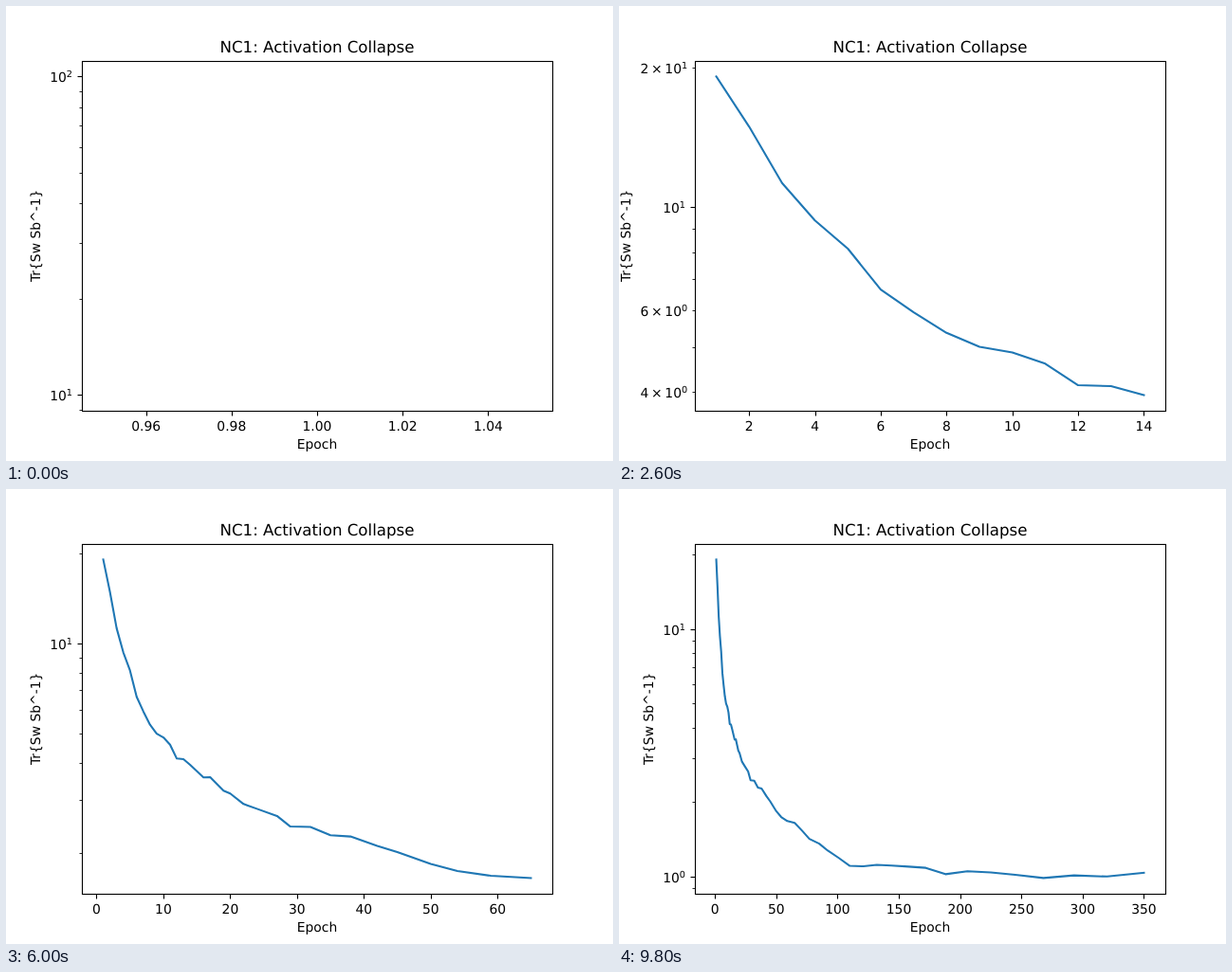
Recreate the animation shown at these times as an HTML page. Size 640x480 px, loop 10000 ms.

```html
<!DOCTYPE html>
<html lang="en">
<head>
<meta charset="utf-8">
<title>Activation Collapse</title>
<style>
  html, body { margin: 0; width: 100%; height: 100%; overflow: hidden; background: #fff; }
  svg { display: block; width: 640px; height: 480px; }
  text { font: 13.889px "DejaVu Sans", sans-serif; text-rendering: geometricPrecision; text-anchor: middle; }
  .title { font-size: 16.667px; }
  .log { text-anchor: end; }
  .sup { font-size: 9.722px; }
  path, rect { fill: none; stroke: #000; stroke-width: 1.11; }
  .minor { stroke-width: .83; }
  .curve { stroke: #1f77b4; stroke-width: 2.083; stroke-linejoin: round; stroke-linecap: square; }
</style>
</head>
<body>
<svg viewBox="0 0 640 480">
  <g id="plot"></g>
  <rect x="80.5" y="58.5" width="496" height="369"/>
  <text class="title" x="328" y="49">NC1: Activation Collapse</text>
  <text x="328" y="467">Epoch</text>
  <text id="ylabel">Tr{Sw Sb^-1}</text>
</svg>
<script>
const STEP_MS = 200;
const epochs = [
  1, 2, 3, 4, 5, 6, 7, 8, 9, 10, 11, 12, 13, 14, 16, 17, 19, 20, 22, 24, 27, 29, 32, 35, 38,
  42, 45, 50, 54, 59, 65, 71, 77, 85, 92, 101, 110, 121, 132, 144, 158, 172, 188, 206, 225,
  245, 268, 293, 320, 350];
// log10 of the plotted value at each epoch
const logs = [
  1.2817, 1.1736, 1.0521, .9714, .9107, .8227, .7738, .7293, .6993, .687,
  .6629, .6165, .6145, .5953, .5536, .5544, .5088, .4994, .4644, .4484,
  .4245, .3892, .3877, .3598, .3558, .3245, .304, .264, .2407, .2245,
  .217, .1857, .1523, .1329, .1049, .075, .0432, .0413, .0473, .0443,
  .0402, .0352, .0095, .0216, .0169, .007, -.006, .0046, 0, .0153];

const plot = document.getElementById('plot');
const ylabel = document.getElementById('ylabel');
const snap = v => Math.floor(v + .5) + .5;
const padded = (lo, hi) => [lo - (hi - lo) * .05, hi + (hi - lo) * .05];

// Round step giving at most nine intervals
function linearTicks([lo, hi]) {
  const raw = (hi - lo) / 9;
  const scale = 10 ** Math.floor(Math.log10(raw));
  const step = [1, 2, 2.5, 5, 10].map(s => s * scale).find(s => s >= raw);
  const ticks = [];
  for (let i = Math.ceil(lo / step); i * step <= hi; i++) ticks.push(i * step);
  let digits = 0;
  while (Math.abs(step * 10 ** digits - Math.round(step * 10 ** digits)) > 1e-6) digits++;
  return { ticks, digits };
}

function logTicks([lo, hi]) {
  const inside = v => Math.log10(v) >= lo && Math.log10(v) <= hi;
  const decades = [0, 1, 2].map(e => 10 ** e).filter(inside);
  let minors = [-1, 0, 1].flatMap(e => [2, 3, 4, 5, 6, 7, 8, 9].map(m => m * 10 ** e)).filter(inside);
  if (minors.length < 2) {
    minors = linearTicks([10 ** lo, 10 ** hi]).ticks.filter(v => !decades.includes(v));
  }
  const span = hi - lo;
  const labelled = span > 1 ? [] : span > .4 ? [1, 2, 3, 4, 6, 10] : [1, 2, 3, 4, 5, 6, 7, 8, 9, 10];
  return [
    ...decades.map(value => ({ value, major: true, label: true, factor: '' })),
    ...minors.map(value => {
      const factor = value / 10 ** Math.floor(Math.log10(value) + 1e-9);
      return { value, label: labelled.includes(Math.round(factor)), factor: String(+factor.toFixed(2)) };
    })];
}

function logLabel({ value, major, factor }, y) {
  const exponent = Math.floor(Math.log10(value) + 1e-9);
  const base = major ? '10' : `${factor}<tspan dx="2.7">×</tspan><tspan dx="2.7">10</tspan>`;
  return `<text class="log" x="${major ? 70 : 72.2}" y="${Math.round(y + 6)}">${base}` +
    `<tspan class="sup" dy="-5.3">${exponent}</tspan></text>`;
}

function draw(count) {
  const single = count === 1;
  const [x0, x1] = single ? [.95, 1.05] : [1, epochs[count - 1]];
  const [y0, y1] = single ? [1, 2] : [Math.min(...logs.slice(0, count)), logs[0]];
  const px = e => 102.545 + (e - x0) / (x1 - x0) * 450.909;
  const py = l => 74.4 + (y1 - l) / (y1 - y0) * 336;
  let svg = '';

  const { ticks, digits } = linearTicks(padded(x0, x1));
  for (const t of ticks) {
    const x = px(t);
    svg += `<path d="M${snap(x)} 427.5v5"/><text x="${x.toFixed(2)}" y="448">${t.toFixed(digits)}</text>`;
  }

  let widest = 0;
  for (const t of logTicks(padded(y0, y1))) {
    const y = py(Math.log10(t.value));
    svg += `<path class="${t.major ? '' : 'minor'}" d="M80.5 ${snap(y)}h${t.major ? -5 : -3}"/>`;
    if (t.label) {
      svg += logLabel(t, y);
      widest = Math.max(widest, t.factor.length);
    }
  }

  if (!single) {
    const points = logs.slice(0, count).map((l, i) => `${px(epochs[i]).toFixed(2)} ${py(l).toFixed(2)}`);
    svg += `<path class="curve" d="M${points.join('L')}"/>`;
  }
  plot.innerHTML = svg;
  const labelX = widest > 1 ? -1 : widest ? 12 : 36;
  ylabel.setAttribute('transform', `translate(${labelX} 242.4) rotate(-90)`);
}

const start = performance.now();
let shown = 0;
function tick() {
  const count = Math.floor((performance.now() - start) / STEP_MS) % epochs.length + 1;
  if (count !== shown) draw(shown = count);
  requestAnimationFrame(tick);
}
tick();
</script>
</body>
</html>
```
